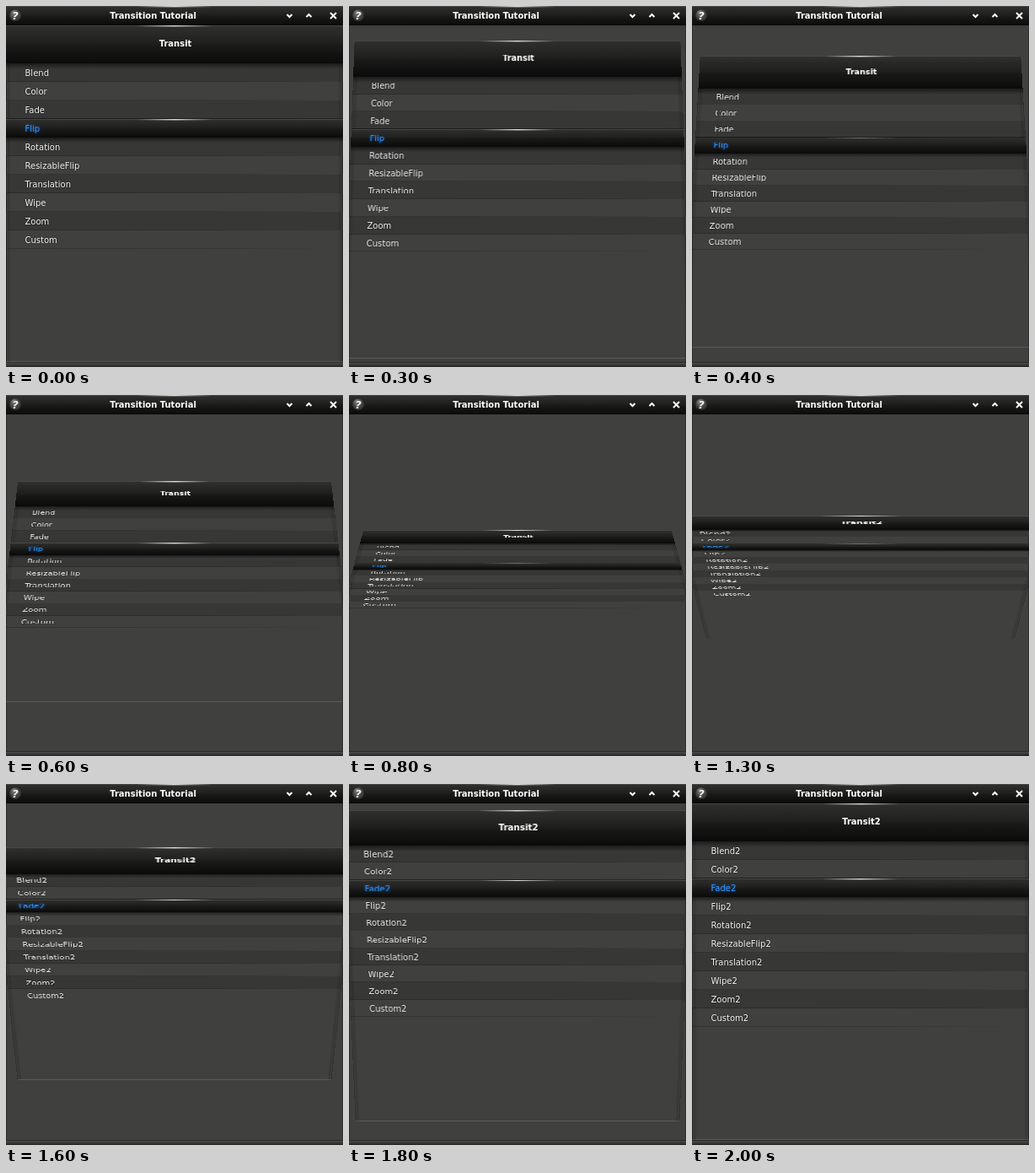
An HTML page with a canvas that plays this animation: 400 by 428 pixels, repeating every 2300 ms.

```html
<!DOCTYPE html>
<html lang="en">
<head>
<meta charset="utf-8">
<title>Transition Tutorial</title>
<style>
  html, body { margin: 0; width: 100%; height: 100%; overflow: hidden; background: #40403e; }
  canvas { display: block; }
</style>
</head>
<body>
<canvas id="stage" width="400" height="428"></canvas>
<script>
const W = 400, H = 428, LOOP = 2300, STEP = 100;
const PAGE_TOP = 23, PAGE_SIZE = 400, HALF = PAGE_SIZE / 2, FOCAL = 2000;
const HEADER = 45, ROW = 22;
const LABELS = ['Blend', 'Color', 'Fade', 'Flip', 'Rotation', 'ResizableFlip',
  'Translation', 'Wipe', 'Zoom', 'Custom'];

// Flip angle in degrees at a time in ms, linear in between.
const ANGLES = [[300, 20], [400, 30.6], [600, 49.5], [800, 70], [1000, 86.3],
  [1300, 111], [1400, 124.5], [1600, 133], [2000, 180]];

function makeLayer(height, paint) {
  const layer = document.createElement('canvas');
  layer.width = W;
  layer.height = height;
  paint(layer.getContext('2d'));
  return layer;
}

function fillGradient(c, x, y, w, h, stops, horizontal) {
  const g = horizontal ? c.createLinearGradient(x, 0, x + w, 0)
                       : c.createLinearGradient(0, y, 0, y + h);
  stops.forEach(([at, color]) => g.addColorStop(at, color));
  c.fillStyle = g;
  c.fillRect(x, y, w, h);
}

function fill(c, color, x, y, w, h) {
  c.fillStyle = color;
  c.fillRect(x, y, w, h);
}

function text(c, str, x, y, color, { style = '', size = 10, align = 'left' } = {}) {
  c.font = `${style} ${size}px "DejaVu Sans", sans-serif`;
  c.textAlign = align;
  c.fillStyle = color;
  c.fillText(str, x, y);
}

function glint(c, y, alpha) {
  fillGradient(c, 155, y, 90, 1, [[0, 'rgba(235,235,230,0)'],
    [0.5, `rgba(235,235,230,${alpha})`], [1, 'rgba(235,235,230,0)']], true);
}

// Glossy black bar with a highlight in the middle of its top edge.
function darkBar(c, y, h) {
  fillGradient(c, 0, y, W, h, [[0, '#30302e'], [0.45, '#20201f'], [0.55, '#191918'], [1, '#0b0b0b']]);
  fill(c, '#464644', 0, y, W, 1);
  glint(c, y, 0.95);
  glint(c, y + 1, 0.35);
}

function shadow(c, y, h, alpha) {
  fillGradient(c, 0, y, W, h, [[0, `rgba(0,0,0,${alpha})`], [1, 'rgba(0,0,0,0)']]);
}

function sideEdges(c, y, h) {
  fillGradient(c, 0, y, 6, h, [[0, 'rgba(0,0,0,.25)'], [1, 'rgba(0,0,0,0)']], true);
  fillGradient(c, W - 6, y, 6, h, [[0, 'rgba(0,0,0,0)'], [1, 'rgba(0,0,0,.25)']], true);
  fill(c, 'rgba(255,255,255,.06)', 1, y, 1, h);
  fill(c, 'rgba(255,255,255,.06)', W - 2, y, 1, h);
}

function makePage(suffix, selected) {
  return makeLayer(PAGE_SIZE, c => {
    const rowTop = i => HEADER + i * ROW;
    LABELS.forEach((label, i) => {
      const y = rowTop(i);
      if (i % 2 === 0) fill(c, '#373836', 0, y, W, ROW);
      fillGradient(c, 0, y + ROW - 1, W, 1,
        [[0, 'rgba(0,0,0,.2)'], [0.6, 'rgba(0,0,0,.16)'], [0.96, 'rgba(0,0,0,0)']], true);
    });
    sideEdges(c, HEADER, PAGE_SIZE - HEADER);

    darkBar(c, 0, HEADER);
    shadow(c, HEADER, 7, 0.5);
    text(c, 'Transit' + suffix, 201, 25, '#fff', { style: 'bold', align: 'center' });

    const y = rowTop(selected);
    fill(c, 'rgba(0,0,0,.4)', 0, y - 1, W, 1);
    darkBar(c, y, ROW);
    shadow(c, y + ROW, 6, 0.55);

    LABELS.forEach((label, i) => {
      const active = i === selected;
      c.shadowColor = active ? '#0a5cc0' : 'rgba(0,0,0,.7)';
      c.shadowBlur = active ? 3 : 2;
      text(c, label + suffix, 22.5, rowTop(i) + 15, active ? '#3399ff' : '#f4f4f4');
    });
    c.shadowColor = 'transparent';

    fill(c, 'rgba(255,255,255,.14)', 0, PAGE_SIZE - 2, W, 1);
  });
}

function strokePath(c, points) {
  c.beginPath();
  points.forEach(([x, y]) => c.lineTo(x, y));
  c.stroke();
}

const frameLayer = makeLayer(H, c => {
  fill(c, '#40403e', 0, 0, W, H);
  fill(c, 'rgba(0,0,0,.3)', 0, PAGE_TOP, 1, H);
  fill(c, 'rgba(0,0,0,.3)', W - 1, PAGE_TOP, 1, H);
  fill(c, 'rgba(0,0,0,.35)', 0, 422, W, 1);
  fillGradient(c, 0, 423, W, 5, [[0, '#4a4a48'], [0.4, '#3c3c3a'], [1, '#252524']]);

  darkBar(c, 0, 23);
  text(c, 'Transition Tutorial', 174.5, 15, '#fff', { style: 'bold', align: 'center' });

  const ball = c.createRadialGradient(9, 7, 1, 11, 11, 7.5);
  ball.addColorStop(0, '#7c7c7a');
  ball.addColorStop(0.5, '#50504e');
  ball.addColorStop(1, '#2a2a29');
  c.fillStyle = ball;
  c.beginPath();
  c.arc(11, 11, 7, 0, Math.PI * 2);
  c.fill();
  text(c, '?', 11, 16, '#f0f0f0', { style: 'italic bold', size: 13, align: 'center' });

  c.strokeStyle = '#fff';
  c.lineWidth = 2;
  strokePath(c, [[333.5, 10], [336.5, 13], [339.5, 10]]);
  strokePath(c, [[356.5, 13], [359.5, 10], [362.5, 13]]);
  strokePath(c, [[385, 8], [392, 15]]);
  strokePath(c, [[392, 8], [385, 15]]);
});

const front = makePage('', 3);
const back = makePage('2', 2);
const ctx = document.getElementById('stage').getContext('2d');

function angleAt(ms) {
  if (ms < ANGLES[0][0]) return 0;
  const next = ANGLES.findIndex(([at]) => at > ms);
  if (next < 0) return 180;
  const [t0, a0] = ANGLES[next - 1], [t1, a1] = ANGLES[next];
  return a0 + (a1 - a0) * (ms - t0) / (t1 - t0);
}

// Turns a page about its horizontal middle; rows are scaled evenly between both edges.
function drawFlipped(page, degrees) {
  const rad = degrees * Math.PI / 180;
  const tilt = HALF * Math.sin(rad) / FOCAL * Math.sign(Math.cos(rad));
  const reach = HALF * Math.abs(Math.cos(rad));
  const topScale = 1 / (1 + tilt), bottomScale = 1 / (1 - tilt);
  const middle = PAGE_TOP + HALF;
  const top = Math.floor(middle - reach * topScale);
  const bottom = Math.ceil(middle + reach * bottomScale);

  for (let y = top; y < bottom; y++) {
    const v = (y - top) / (bottom - top);
    const width = W * (topScale + (bottomScale - topScale) * v);
    ctx.drawImage(page, 0, Math.floor(v * PAGE_SIZE), W, 1, (W - width) / 2, y, width, 1);
  }
}

function render(now) {
  const time = Math.floor((now % LOOP) / STEP) * STEP;
  const angle = angleAt(time);
  const page = angle < 90 ? front : back;
  ctx.drawImage(frameLayer, 0, 0);
  if (angle % 180 === 0) ctx.drawImage(page, 0, PAGE_TOP);
  else drawFlipped(page, angle);
}

const start = performance.now();
function tick() {
  render(performance.now() - start);
  requestAnimationFrame(tick);
}
tick();
</script>
</body>
</html>
```
